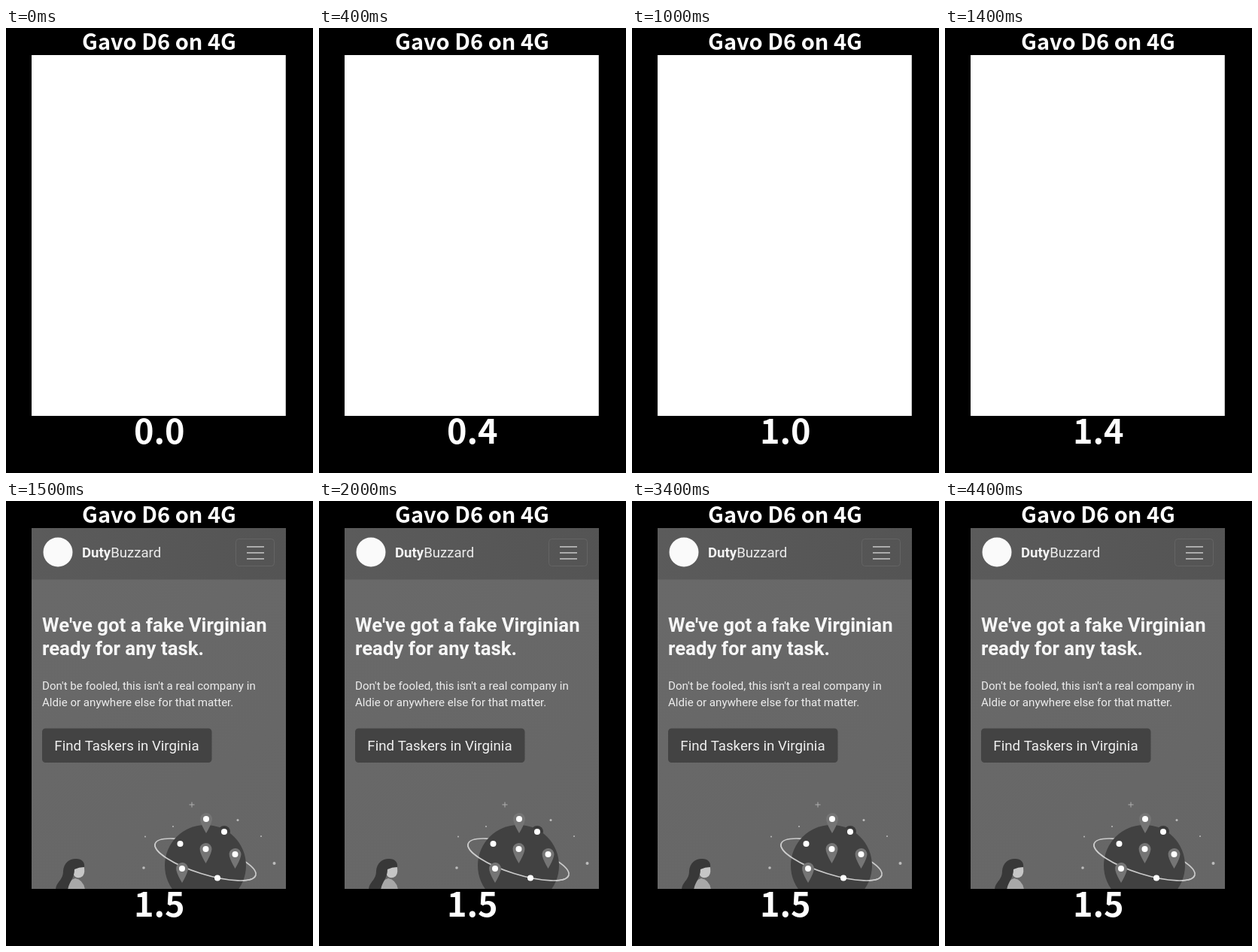
Write an HTML page with a canvas that moves like this. It is 408 by 592 pixels and loops after 4500 ms.

```html
<!DOCTYPE html>
<html lang="en">
<head>
<meta charset="utf-8">
<title>Page load timer</title>
<style>
html, body { margin: 0; width: 100%; height: 100%; overflow: hidden; background: #000; }
canvas { display: block; width: 408px; height: 592px; }
</style>
</head>
<body>
<canvas id="stage" width="408" height="592"></canvas>
<script>
const ctx = document.getElementById('stage').getContext('2d');
const LOOP = 4500, LOADED = 1500;
const CAPTION = '"Noto Sans CJK JP", "Noto Sans CJK SC", "Noto Sans CJK", "Noto Sans", sans-serif';
const PAGE = 'Roboto, sans-serif';

function text(str, x, y, size, weight, color) {
  ctx.font = `${weight} ${size}px ${PAGE}`;
  ctx.textAlign = 'left';
  ctx.fillStyle = color;
  ctx.fillText(str, x, y);
  return x + ctx.measureText(str).width;
}

function caption(str, x, y, size) {
  ctx.font = `700 ${size}px ${CAPTION}`;
  ctx.textAlign = 'center';
  ctx.fillStyle = '#fff';
  ctx.fillText(str, x, y);
}

function disc(x, y, r, color) {
  ctx.fillStyle = color;
  ctx.beginPath();
  ctx.arc(x, y, r, 0, Math.PI * 2);
  ctx.fill();
}

function box(x, y, w, h, r) {
  ctx.beginPath();
  ctx.roundRect(x, y, w, h, r);
}

function fade(x0, y0, x1, y1, from, to) {
  const g = ctx.createLinearGradient(x0, y0, x1, y1);
  g.addColorStop(0, from);
  g.addColorStop(1, to);
  return g;
}

function shape(d, color) {
  ctx.fillStyle = color;
  ctx.fill(new Path2D(d));
}

function pin(x, y) {
  ctx.fillStyle = '#757575';
  ctx.beginPath();
  ctx.arc(x, y, 8, Math.PI * 0.9, Math.PI * 0.1);
  ctx.quadraticCurveTo(x + 6, y + 9, x, y + 19);
  ctx.quadraticCurveTo(x - 6, y + 9, x - 7.6, y + 2.5);
  ctx.fill();
  disc(x, y, 4, '#fff');
}

function ring(end) {
  ctx.strokeStyle = '#cacaca';
  ctx.lineWidth = 1.7;
  ctx.beginPath();
  ctx.ellipse(265, 477, 70, 19.4, 0.305, 0, end);
  ctx.stroke();
}

function header() {
  ctx.fillStyle = fade(34, 36, 372, 105, '#5b5b5b', '#545454');
  ctx.fillRect(34, 36, 338, 68.5);

  disc(69, 68, 19.5, '#fafafa');
  const x = text('Duty', 101, 74.5, 18.6, 700, '#f4f4f4');
  text('Buzzard', x, 74.5, 18.6, 400, '#ececec');

  ctx.strokeStyle = '#646464';
  ctx.lineWidth = 1;
  box(305.5, 50.5, 51, 36, 4);
  ctx.stroke();
  ctx.fillStyle = '#b4b4b4';
  for (const y of [60, 68, 76]) ctx.fillRect(320, y, 23, 1.8);
}

function globe() {
  ring(Math.PI * 2);
  disc(290, 440, 8, '#3a3a3a');
  disc(265, 485, 54, '#414141');
  ring(Math.PI);
  disc(290, 440, 4, '#fff');
  for (const [x, y] of [[266, 423], [265.5, 463], [304.5, 470], [234, 489]]) pin(x, y);
  disc(231.5, 456, 4, '#fff');
  disc(281, 501.5, 4, '#fff');

  const stars = [[222, 433, 1], [185, 446.5, 1], [183, 488, 1.8],
    [308, 424.5, 1.5], [339, 446, 1], [356.5, 482, 2]];
  for (const [x, y, r] of stars) disc(x, y, r, '#bdbdbd');
  ctx.fillStyle = '#b0b0b0';
  ctx.fillRect(243.5, 403.5, 7, 1);
  ctx.fillRect(246.5, 400.5, 1, 7);
}

function woman() {
  shape('M82 517 Q83 504 92 502 Q103 504 105 517 Z', '#a8a8a8');
  shape('M88 488 Q97 488 103 484 Q106 494 102 499 Q97 503 92 500 Q88 496 88 488 Z', '#c6c6c6');
  shape('M66 517 C67 506 76 505 76 492 C77 480 86 475 94 476 C101 476 105 481 104 487 Q97 487 91 490 C91 502 84 506 82 517 Z', '#383838');
}

function page() {
  ctx.save();
  ctx.beginPath();
  ctx.rect(34, 36, 338, 480);
  ctx.clip();
  ctx.fillStyle = fade(34, 105, 372, 516, '#696969', '#666666');
  ctx.fillRect(34, 36, 338, 480);
  header();

  text("We've got a fake Virginian", 48, 174, 25.75, 700, '#f6f6f6');
  text('ready for any task.', 48, 205, 25.75, 700, '#f6f6f6');
  text("Don't be fooled, this isn't a real company in", 48, 251, 15.08, 400, '#ededed');
  text('Aldie or anywhere else for that matter.', 48, 273, 15.08, 400, '#ededed');

  box(48, 302.5, 225.5, 45.5, 4.5);
  ctx.fillStyle = '#434343';
  ctx.fill();
  text('Find Taskers in Virginia', 64.3, 331.5, 18.7, 400, '#efefef');

  globe();
  woman();
  ctx.restore();
}

function blank() {
  ctx.fillStyle = '#fff';
  ctx.fillRect(34, 36, 338, 480);
  ctx.fillStyle = '#c8c8c8';
  ctx.fillRect(371, 36, 1, 480);
}

function draw(t) {
  ctx.fillStyle = '#000';
  ctx.fillRect(0, 0, 408, 592);
  caption('Gavo D6 on 4G', 203.5, 29, 29);
  if (t < LOADED) blank(); else page();
  const tenths = Math.floor(Math.min(t, LOADED) / 100);
  caption((tenths / 10).toFixed(1), 203.8, 553, 45);
}

const start = performance.now();
function tick() {
  draw((performance.now() - start) % LOOP);
  requestAnimationFrame(tick);
}
tick();
</script>
</body>
</html>
```
